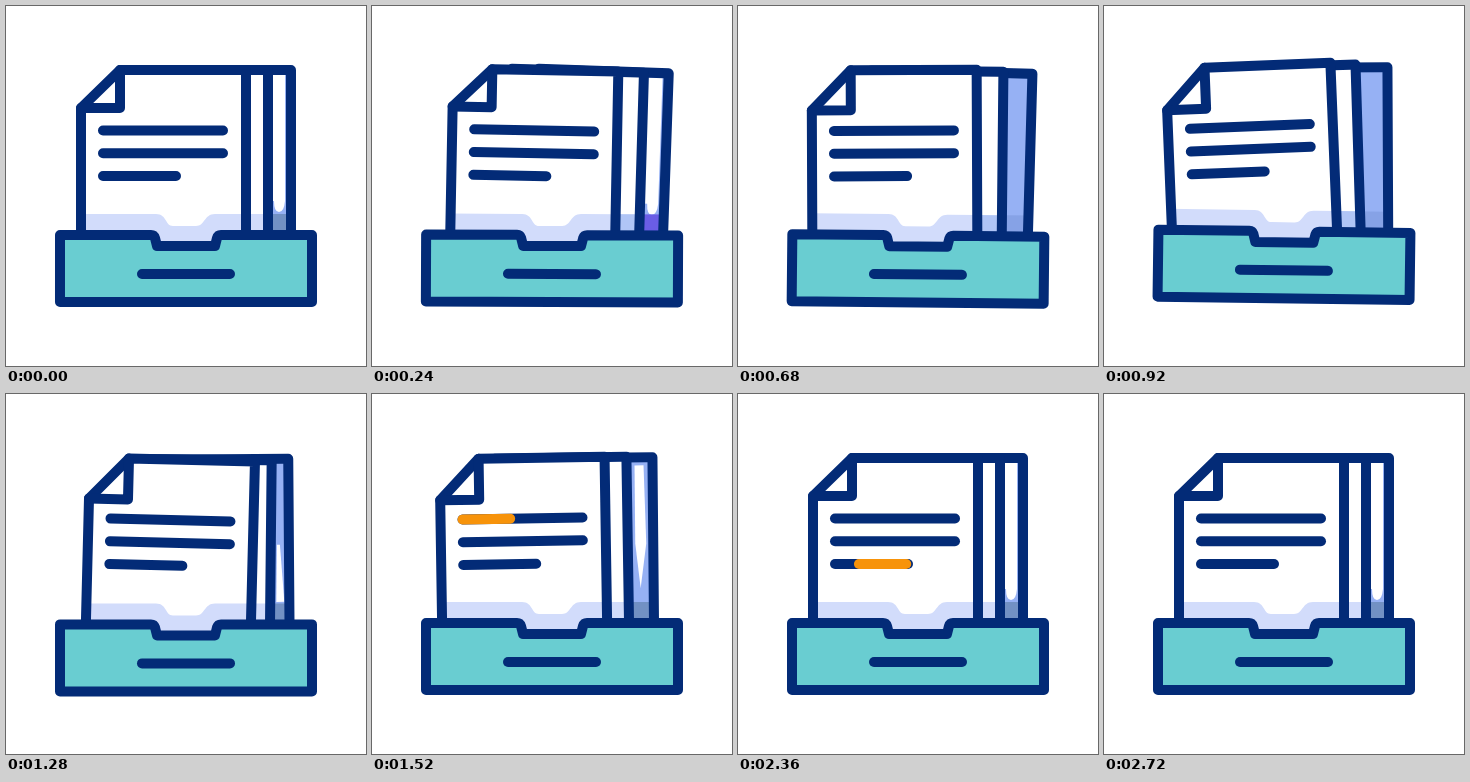
An HTML page for the animation above (2.8 s loop, 360 by 360 pixels).

```html
<!DOCTYPE html>
<html>
<head>
<meta charset="utf-8">
<style>
html, body { margin: 0; width: 100%; height: 100%; overflow: hidden; background: #fff; }
svg { display: block; width: 100vw; height: 100vh; }
.ink { fill: none; stroke: #032b77; stroke-width: 10; stroke-linecap: round; stroke-linejoin: round; }
.mark { fill: none; stroke: #f7930a; stroke-width: 10; stroke-linecap: round; }
</style>
</head>
<body>
<svg viewBox="0 0 360 360">
  <defs>
    <path id="shape0" d="M155 250V64H285V250Z"/>
    <path id="shape1" d="M130 250V64H262V250Z"/>
    <path id="shape2"/>
    <path id="shade" d="M40 208H150C161 208 159 220 167 220H190C199 220 198 208 209 208H320V250H40Z"/>
  </defs>
  <g id="pages"></g>
  <g id="tray">
    <path class="ink" style="fill:#69cdd1" d="M54 229H145Q148 229 149 232L151 240H209L211 232Q212 229 215 229H306V296H54Z"/>
    <path class="ink" d="M136 268H224"/>
  </g>
</svg>
<script>
const LOOP = 2800, SETTLE = 1680;
const NS = 'http://www.w3.org/2000/svg';
const $ = id => document.getElementById(id);

function add(parent, tag, attrs) {
  const el = document.createElementNS(NS, tag);
  for (const k in attrs) el.setAttribute(k, attrs[k]);
  parent.appendChild(el);
  return el;
}

const ease = x => { x = Math.min(1, Math.max(0, x)); return x * x * (3 - 2 * x); };

// Eases through the given turning points, starting and ending at zero.
function sway(times, peaks) {
  const v = [0, ...peaks, 0];
  return t => v.reduce((sum, x, i) => i
    ? sum + (x - v[i - 1]) * ease((t - times[i - 1]) / (times[i] - times[i - 1]))
    : 0, 0);
}

const beats = [0, 440, 920, 1280, 1520, SETTLE];
const tilt = sway(beats, [0.4, 0.75, 0, 0]);
const bob = sway([290, 580, 800, 1100, 1400], [7, -8, 4]);

// Back to front; the back pages lag behind the front one.
const pages = [
  { pivot: 205, edge: 285, fill: '#96b1f4', slide: sway(beats, [10.6, -0.8, -1.5, -3]) },
  { pivot: 180, edge: 240, fill: '#fff', slide: sway(beats, [9, -5.4, 2, -5]) },
  { pivot: 155, edge: 155, fill: '#fff', slide: sway(beats, [5.7, -7, 4.9, -4.9]) }
];

pages.forEach((p, i) => {
  const root = $('pages'), ref = '#shape' + i;
  p.clip = add(add(root, 'clipPath', { id: 'clip' + i }), 'use', { href: ref });
  p.body = add(root, 'g', {});
  add(p.body, 'use', { href: ref, fill: p.fill });
  const g = add(root, 'g', { 'clip-path': `url(#clip${i})` });
  p.shade = add(g, 'use', { href: '#shade', fill: '#d2dcfb' });
  p.top = add(root, 'g', {});
  add(p.top, 'use', { href: ref, class: 'ink' });
});

const [back, middle, front] = pages;
const glow = add(back.body, 'path', { fill: '#fff' });
const flap = add(front.top, 'path', { class: 'ink' });

const lines = [120, 120, 73].map((len, i) => {
  const y = 124.5 + 22.75 * i;
  add(front.top, 'path', { class: 'ink', d: `M97 ${y}h${len}` });
  return { y, len, start: 1340 + 320 * i, el: add(front.top, 'path', { class: 'mark' }) };
});

const FULL = 'M260 69H279V195Q278 206 273 206Q268 206 268 195H260Z';
const LOW = 'M273 150H276L280 207H272Z';
const SPINDLE = 'M267 72H276L278 150L272 195L267 150Z';

function drawPages(t) {
  const y = bob(t), a = tilt(t);
  const trayMove = `translate(0 ${y}) rotate(${a} 180 262)`;
  const stiff = 0.33 * (1 - (Math.min(t, SETTLE) / SETTLE) ** 8);
  $('tray').setAttribute('transform', trayMove);

  for (const p of pages) {
    const x = p.slide(t), dy = y + (p.edge - 180) * a * Math.PI / 180;
    const move = `translate(${x} ${dy}) rotate(${x * stiff} ${p.pivot} 228)`;
    for (const el of [p.clip, p.body, p.top]) el.setAttribute('transform', move);
    p.shade.setAttribute('transform', trayMove);
  }

  const fold = 102 + 3 * (ease((t - 500) / 300) - ease((t - 1520) / 160));
  $('shape2').setAttribute('d', `M75 250V${fold}L114 64H240V250Z`);
  flap.setAttribute('d', `M114 64V${fold}H75`);
}

function drawLight(t) {
  const swung = t >= 200 && t < 1200;
  const shape = t < 600 || t >= 1640 ? FULL : t < 1240 ? '' : t < 1400 ? LOW : SPINDLE;
  glow.setAttribute('d', shape);
  middle.shade.setAttribute('fill', swung ? '#b0c5f6' : '#d2dcfb');
  back.shade.setAttribute('fill', !swung ? '#7291c4' : t < 600 ? '#6a5de6' : '#86a2e6');
}

function drawMarks(t) {
  for (const l of lines) {
    const s = t - l.start;
    const to = ease(s / 420), from = ease((s - 220) / 420);
    const on = to - from > 0.001;
    l.el.setAttribute('d', on ? `M${97 + l.len * from} ${l.y}H${97 + l.len * to}` : '');
  }
}

const t0 = performance.now();
function tick() {
  const t = (performance.now() - t0) % LOOP;
  drawPages(t);
  drawLight(t);
  drawMarks(t);
  requestAnimationFrame(tick);
}
tick();
</script>
</body>
</html>
```
